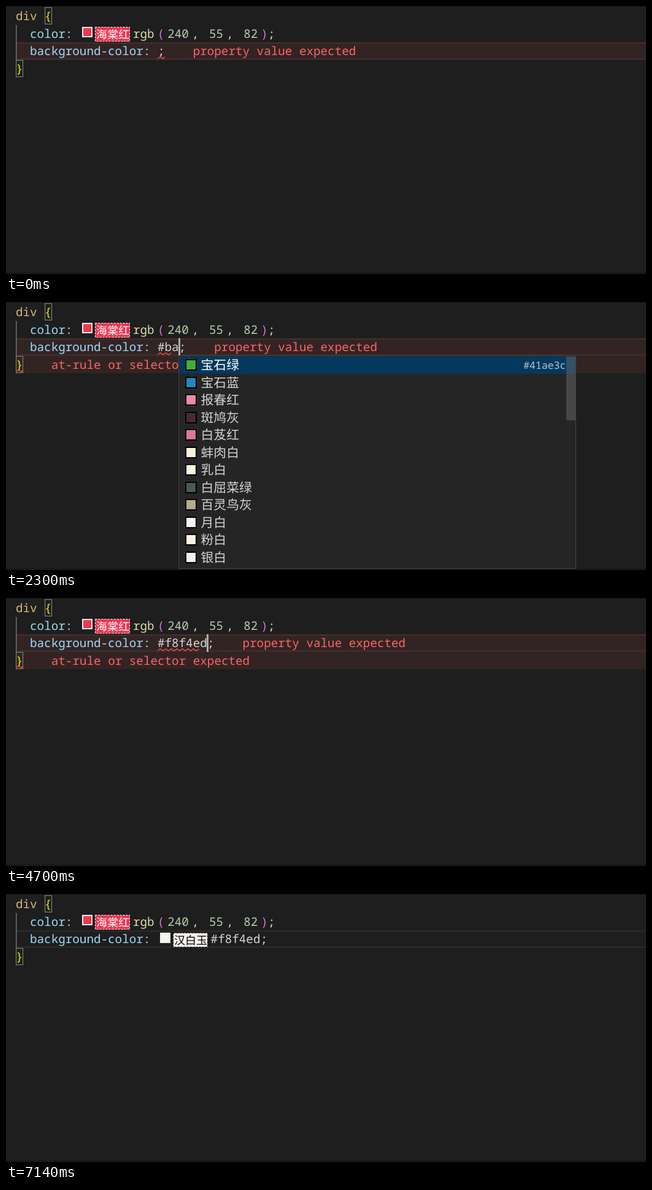
These frames come from a looping animation (1043 by 437 pixels, 7.61 s). An HTML page:

```html
<!DOCTYPE html>
<html lang="zh-CN">
<head>
<meta charset="utf-8">
<title>Colour name completion</title>
<style>
  html, body { margin: 0; width: 100%; height: 100%; overflow: hidden; background: #1e1e1e; }
  svg { display: block; width: 1043px; height: 437px; }
  text { white-space: pre; text-rendering: geometricPrecision; font: 500 19.25px "Noto Sans Mono", "DejaVu Sans Mono", monospace; }
  .cjk { font: 300 20.8px "Noto Sans CJK SC", "Noto Sans CJK", sans-serif; }
  .tag { font-size: 18px; }
  .hex { font-size: 16.5px; text-anchor: end; }
</style>
</head>
<body>
<svg id="stage" viewBox="0 0 1043 437"></svg>
<script>
const LOOP = 7610, CH = 11.55, VALUE_X = 246.9, ROW = 28.5;
const PLAIN = '#d4d4d4', ERROR = '#ff6464', GOLD = '#ffd700', PINK = '#da70d6', NUM = '#b5cea8';
const RED = '#f03752', JADE = '#f8f4ed';

const parse = s => s.split(' ').map(item => item.split('#'));
const LISTS = {
  all: parse('丁香棕#71361d 丁香淡紫#e0d9de 万寿菊黄#fb8b05 中灰#bbb5ac 中灰驼#603d30 中红灰#8b614d ' +
    '丹紫红#d2568c 丽春红#eb261a 乌梅紫#1e131d 乳白#f9f4dc 乳鸭黄#ffc90c 云山蓝#2f90b9'),
  ba: parse('宝石绿#41ae3c 宝石蓝#2486b9 报春红#ec8aa4 斑鸠灰#482936 白芨红#de7897 蚌肉白#f9f1db ' +
    '乳白#f9f4dc 白屈菜绿#485b4d 百灵鸟灰#b4a992 月白#eef7f2 粉白#fbf2e3 银白#f1f0ed'),
  bai: parse('白芨红#de7897 乳白#f9f4dc 白屈菜绿#485b4d 百灵鸟灰#b4a992 月白#eef7f2 粉白#fbf2e3 ' +
    '银白#f1f0ed 云峰白#d8e3e7 象牙白#fffef8 鱼肚白#f7f4ed 汉白玉#f8f4ed 荔肉白#f2e6ce'),
  one: parse('汉白玉#f8f4ed')
};

// Each entry changes part of the state from its time on.
const STEPS = [
  [0, { text: '', cursor: false, wave: 1, errors: true, brace: 0, list: '', bar: 0, barH: 0, tag: false, swatch: false }],
  [260, { cursor: true }],
  [800, { text: '#' }],
  [920, { brace: 1 }],
  [990, { brace: 2 }],
  [1060, { list: 'all', bar: 0.4, barH: 28 }],
  [1330, { cursor: false }],
  [1740, { bar: 0.14 }],
  [1880, { cursor: true }],
  [2230, { text: '#b', list: 'ba', bar: 0.4, barH: 104 }],
  [2300, { text: '#ba', wave: 2 }],
  [2450, { text: '#bai', wave: 3 }],
  [2510, { list: 'bai', barH: 205 }],
  [2570, { wave: 4 }],
  [2970, { cursor: false }],
  [3330, { text: '#baiy', cursor: true, list: 'one', bar: 0.14, barH: 31 }],
  [3400, { wave: 5 }],
  [3550, { text: '#baiyu' }],
  [3620, { wave: 6 }],
  [4090, { cursor: false }],
  [4560, { cursor: true }],
  [4700, { text: '#f8f4ed', list: '' }],
  [4760, { errors: false, brace: 0, tag: true }],
  [5160, { cursor: false }],
  [5630, { cursor: true }],
  [5690, { swatch: true }],
  [6150, { cursor: false }],
  [6690, { cursor: true }],
  [7140, { cursor: false }]
];

const rect = (x, y, w, h, fill, more = '') =>
  `<rect x="${x}" y="${y}" width="${w}" height="${h}" fill="${fill}" ${more}/>`;
const text = (x, y, s, fill, cls = '') =>
  `<text x="${x}" y="${y}" fill="${fill}" class="${cls}">${s}</text>`;

function wave(x, y, w) {
  let d = `M${x} ${y + 3}`;
  for (let i = 1; i * 4.5 <= w + 2; i++) d += `L${x + Math.min(i * 4.5, w)} ${y + (i % 2 ? 0 : 3)}`;
  return `<path d="${d}" fill="none" stroke="#f14c4c" stroke-width="1.5"/>`;
}

const swatch = (x, y, size, fill, edge) =>
  rect(x, y, size, size, edge) + rect(x + 2, y + 2, size - 4, size - 4, fill);

const tag = (x, y, name, fill, ink) =>
  rect(x + 0.5, y + 0.5, 56, 23, fill, `stroke="${ink}" stroke-dasharray="3 2"`) +
  text(x + 2, y + 19, name, ink, 'cjk tag');

const braceBox = (x, y) =>
  rect(x + 0.5, y + 0.5, 11, 27, '#006400', 'fill-opacity=".1" stroke="#888"');

function fixedCode() {
  let out = braceBox(63, 2) + text(16, 23, 'div', '#d7ba7d') + text(62.7, 23, '{', GOLD);
  out += text(39, 52, 'color:', '#9cdcfe') + swatch(124, 34, 17, RED, '#eee');
  out += tag(145, 34, '海棠红', RED, '#fff');
  // Small gaps separate the tokens of the colour function.
  let x = 207;
  const tokens = [['rgb', '#dcdcaa'], ['(', PINK], ['240', NUM], [', ', PLAIN], ['55', NUM],
    [', ', PLAIN], ['82', NUM], [')', PINK]];
  for (const [s, fill] of tokens) {
    out += text(x, 52, s, fill);
    x += s.length * CH + 5;
  }
  return out + text(x - 5, 52, ';', PLAIN);
}

function popup(end, s) {
  const items = LISTS[s.list], single = items.length === 1;
  const x = Math.round(end - 0.3);
  let out = rect(x + 0.5, 87.5, 647, single ? 34 : 347, '#252526', 'stroke="#454545"');
  out += rect(x + 2, 89, 644, single ? 31 : 28, '#04395e');
  items.forEach(([name, hex], i) => {
    const y = 102.75 + i * ROW;
    out += swatch(Math.floor(end + 10.6), Math.round(y - 9.5), 19, '#' + hex, '#000');
    out += text(end + 36, y + 7.7, name, i ? PLAIN : '#fff', 'cjk');
  });
  out += text(x + 631.5, 109, '#' + items[0][1], '#b4c4cf', 'hex');
  return out + rect(x + 632, 89, 15, s.barH, '#797979', `fill-opacity="${s.bar}"`);
}

const FIXED = fixedCode();

function draw(s) {
  const start = VALUE_X + (s.tag ? 61 : 0) + (s.swatch ? 25.7 : 0);
  const end = start + s.text.length * CH;
  let out = rect(0, 0, 1043, 437, '#1e1e1e') + rect(0, 0, 1043, 1, '#161616') +
    rect(0, 434, 1043, 3, '#1c191d');
  if (s.errors) out += rect(16, 59, 1027, 29, '#332424');
  if (s.brace === 2) out += rect(16, 88, 1027, 28, '#332424');
  for (const y of [59, 85]) out += rect(16, y, 1027, 3, '#fff', 'fill-opacity=".045"');
  out += rect(16, 31, 1.5, 57, '#707070') + FIXED;

  out += text(39, 80, 'background-color:', '#9cdcfe');
  if (s.swatch) out += swatch(251, 63, 17, JADE, '#eee');
  if (s.tag) out += tag(s.swatch ? 272 : 247, 63, '汉白玉', JADE, '#000');
  out += text(start, 80, s.text + ';', PLAIN);
  if (s.errors) {
    out += wave(VALUE_X, 83, s.wave * CH);
    out += text(end + 5 * CH, 80, 'property value expected', ERROR);
  }

  out += braceBox(16, 88) + text(16, 109, '}', GOLD);
  if (s.brace) out += wave(16, 111, CH);
  if (s.brace === 2) out += text(16 + 5 * CH, 109, 'at-rule or selector expected', ERROR);
  if (s.cursor) out += rect(Math.floor(end - 0.3), 59, 3, 29, '#aeafad');
  if (s.list) out += popup(end, s);
  return out;
}

function stateAt(t) {
  const s = {};
  for (const [from, change] of STEPS) if (t >= from) Object.assign(s, change);
  return s;
}

const stage = document.getElementById('stage');
const began = performance.now();
let shown = '';

function frame() {
  const picture = draw(stateAt((performance.now() - began) % LOOP));
  if (picture !== shown) stage.innerHTML = shown = picture;
  requestAnimationFrame(frame);
}
frame();
</script>
</body>
</html>
```
